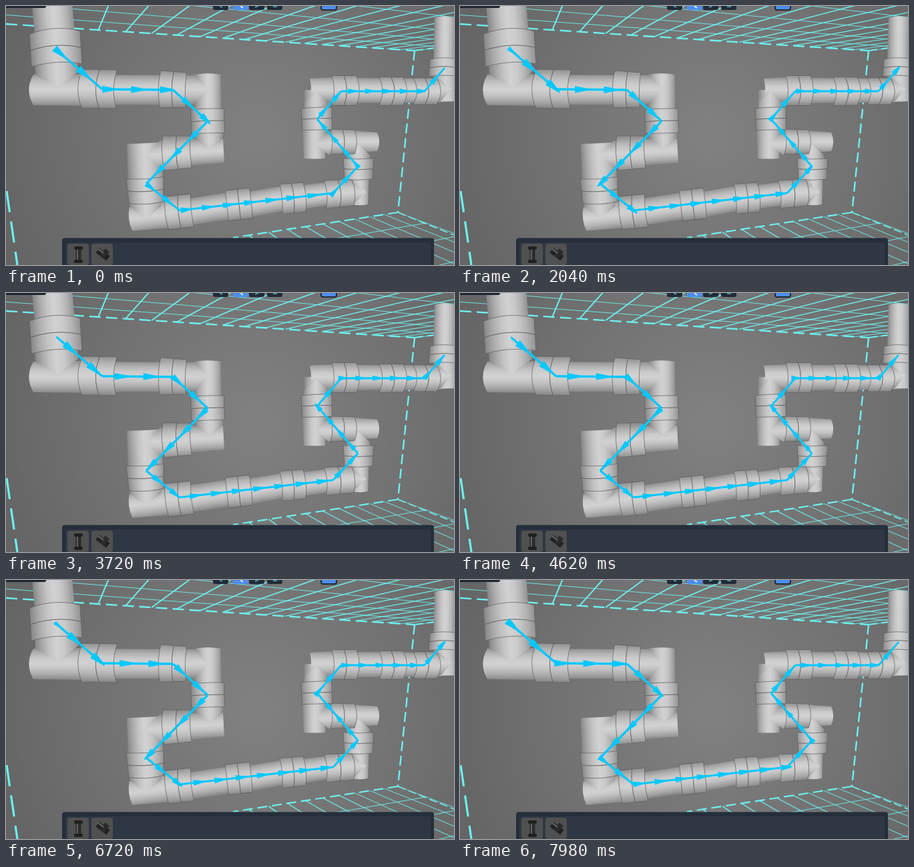
Write an HTML page with a canvas that moves like this. It is 671x389 px and loops after 8040 ms.

```html
<!DOCTYPE html>
<html lang="en">
<head>
<meta charset="utf-8">
<title>Pipe flow</title>
<style>
  html, body { margin: 0; width: 100%; height: 100%; overflow: hidden; background: #6b6b6b; }
  canvas { display: block; }
</style>
</head>
<body>
<canvas id="stage" width="671" height="389"></canvas>
<script>
const W = 671, H = 389;
const CYAN = '#6cf0ee', FLOW = '#06c8ff';
const stage = document.getElementById('stage').getContext('2d');
const scene = document.createElement('canvas');
scene.width = W;
scene.height = H;
const g = scene.getContext('2d');

function line(x1, y1, x2, y2, width, dash = [], color = CYAN) {
  g.strokeStyle = color;
  g.lineWidth = width;
  g.setLineDash(dash);
  g.beginPath();
  g.moveTo(x1, y1);
  g.lineTo(x2, y2);
  g.stroke();
  g.setLineDash([]);
}

function box(x, y, w, h, r, color) {
  g.fillStyle = color;
  g.beginPath();
  g.roundRect(x, y, w, h, r);
  g.fill();
}

// ---- Room ----
const DEPTH_VP = [100, 128], SIDE_VP = [1707, 139];

// Perspective grid starting at the far right corner (cx, cy) of a floor or ceiling
function grid(cx, cy, slope, count) {
  let x = cx, step = 20.5;
  for (let k = 0; k <= count; k++) {
    const y = cy + slope * (x - cx);
    line(x, y, x + (x - DEPTH_VP[0]) * 3, y + (y - DEPTH_VP[1]) * 3, 0.8 + k * 0.075);
    x -= step;
    step /= 0.955;
  }
  for (let k = 1; k <= 8; k++) {
    const m = k * 0.08 / (1 - k * 0.08);
    const qx = cx + (cx - DEPTH_VP[0]) * m, qy = cy + (cy - DEPTH_VP[1]) * m;
    line(qx, qy, qx * 2 - SIDE_VP[0], qy * 2 - SIDE_VP[1], 0.9);
  }
}

function drawRoom() {
  const light = g.createRadialGradient(375, 195, 20, 375, 195, 400);
  light.addColorStop(0, '#808080');
  light.addColorStop(0.55, '#727272');
  light.addColorStop(1, '#656565');
  g.fillStyle = light;
  g.fillRect(0, 0, W, H);

  grid(612, 67, 0.0654, 16);
  grid(587, 310, -0.153, 9);
  line(0, 27, 612, 67, 2.4, [17, 8]);
  line(612, 67, 671, 59, 2, [13, 6]);
  line(612, 67, 587, 310, 2.4, [15, 7]);
  line(587, 310, 340, 348, 2.2, [15, 7]);
  line(587, 310, 671, 344, 1.6, [12, 5]);
  line(1, 278, 17, 389, 3.2, [32, 14]);
}

// ---- Pipes ----
const bulgeAt = (x, y, r, a) =>
  2 * r * ((x - 330) * Math.cos(a) + (y - 190) * Math.sin(a)) / 1000;

// Shaded cylinder; a nonzero tip turns its far end into a mitre point
function tube(x1, y1, r1, x2, y2, r2, tip = 0, rim = false) {
  const a = Math.atan2(y2 - y1, x2 - x1), len = Math.hypot(x2 - x1, y2 - y1);
  const r = Math.max(r1, r2);
  const shade = g.createLinearGradient(0, -r, 0, r);
  ['#929292', '#b3b3b3', '#cacaca', '#d2d2d2', '#c3c3c3', '#a9a9a9', '#868686']
    .forEach((c, i) => shade.addColorStop(i / 6, c));
  g.save();
  g.translate(x1, y1);
  g.rotate(a);
  g.beginPath();
  g.moveTo(0, -r1);
  g.lineTo(len, -r2);
  if (tip) {
    g.lineTo(len + tip, 0);
    g.lineTo(len, r2);
  } else {
    g.quadraticCurveTo(len + bulgeAt(x2, y2, r2, a), 0, len, r2);
  }
  g.lineTo(0, r1);
  g.quadraticCurveTo(bulgeAt(x1, y1, r1, a), 0, 0, -r1);
  g.fillStyle = shade;
  g.fill();
  if (rim) {
    g.strokeStyle = 'rgba(95,95,95,.7)';
    g.lineWidth = 1;
    g.stroke();
  }
  g.restore();
}

// Two-ring coupling
function collar(x1, y1, r1, x2, y2, r2) {
  const mx = (x1 + x2) / 2, my = (y1 + y2) / 2, mr = (r1 + r2) / 2;
  tube(x1, y1, r1, mx, my, mr, 0, true);
  tube(mx, my, mr, x2, y2, r2, 0, true);
}

function drawPipes() {
  // inlet
  tube(69, -4, 30, 73, 45, 30);
  tube(41, 126, 23, 125, 126, 24);
  tube(75, 85, 32, 76, 101, 32, 21);
  collar(73, 40, 38, 76, 89, 38);
  // upper left run
  tube(160, 126, 22.5, 240, 126, 22);
  tube(302, 103, 19.5, 302, 160, 20);
  tube(266, 126, 22, 282, 126, 22, 19);
  collar(114, 124, 29, 166, 125, 29);
  collar(231, 125, 28, 270, 126, 26);
  // first step down
  tube(268, 220, 20, 326, 217, 18);
  tube(303, 185, 20.5, 304, 198, 20.5, 14);
  collar(301.5, 155, 25, 302.5, 191, 25);
  tube(206, 206, 25, 209, 262, 26);
  tube(243, 222, 22, 231, 222.5, 20, 22);
  collar(277, 219, 24, 236, 221, 26);
  // second step down
  tube(187, 320, 18, 248, 312, 21);
  tube(209, 288, 25, 209, 301, 23, 19);
  collar(208, 258, 28, 210, 295, 26);
  // long bottom run
  tube(276, 309, 20, 336, 300, 20);
  tube(364, 298, 19, 416, 289, 18.5);
  tube(444, 287, 18, 482, 282, 17.5);
  tube(529, 256, 14.5, 530, 298, 12);
  tube(510, 281, 18, 519, 280.5, 17, 21);
  collar(241, 311, 25, 279, 307, 25);
  collar(331, 300, 23, 367, 296, 23);
  collar(412, 290, 22.5, 447, 287, 22);
  collar(478, 283, 21, 519, 280, 20);
  // steps up on the right
  tube(515, 204, 17, 556, 204, 14);
  tube(528, 235, 18, 528, 224, 17, 16);
  collar(528, 260, 21, 528, 229, 23);
  tube(462, 178, 18, 462, 229, 16);
  tube(500, 205, 18, 482, 206, 17, 18);
  collar(486, 204, 19, 522, 204, 18);
  tube(466, 127, 19, 465, 160, 18);
  tube(455, 126, 17, 492, 126, 19);
  tube(465, 158, 18, 465, 146, 18, 17);
  collar(465, 153, 23, 466, 186, 22.5);
  // upper right run and outlet
  tube(520, 127, 19, 565, 127, 18.5);
  tube(592, 127, 18.5, 618, 127, 18);
  collar(488, 127, 22.5, 525, 127, 22.5);
  collar(559, 128, 21.5, 595, 128, 21);
  tube(657, 18, 15, 656, 84, 16);
  tube(657, 100, 18, 659, 144, 16);
  tube(640, 127, 18, 649, 126, 17, 19);
  collar(610, 128, 20, 645, 128, 20);
  collar(656, 80, 21, 656, 106, 23);
}

// ---- Interface ----
function drawInterface() {
  box(-5, -6, 65, 9, 3, '#1f2630');
  for (const x of [310, 364, 391]) box(x, -16, 23, 22, 3, '#222b37');
  box(340, -16, 23, 22, 3, '#4c8df0');
  box(471, -16, 25, 23, 4, '#222b37');
  box(473, -16, 21, 21, 2, '#4c8df0');
  line(320, 0, 324, 2, 1.5, [], '#43b7c4');
  line(351, 0, 355, 3, 2, [], '#e6efff');
  line(373, 2, 378, 0, 1.5, [], '#43b7c4');
  line(400, 1, 406, 1, 1.5, [], '#43b7c4');

  box(84, 348.5, 557, 50, 4, '#252e3b');
  box(89, 355, 547, 45, 3, '#2e3744');
  box(92, 357, 32, 32, 4, '#505050');
  box(128, 357, 32, 32, 4, '#505050');
  // straight pipe icon
  box(104.5, 362, 8, 22, 1, '#2b2b2b');
  box(102, 361, 13, 5, 2, '#202020');
  box(102, 381, 13, 5, 2, '#202020');
  line(107, 366, 107, 381, 1.5, [], '#747474');
  // branch icon
  line(137, 367, 153, 379, 9, [], '#222');
  line(143, 377, 152, 367, 8, [], '#2b2b2b');
  line(138, 365, 146, 371, 2, [], '#6c6c6c');
}

drawRoom();
drawPipes();
drawInterface();

// ---- Flow: x, y and distance along the route in arrow spacings ----
const route = [
  [78, 68, -0.1], [144, 125, 1.75], [250, 126, 4.2], [302, 173, 6.1],
  [210, 267, 9.75], [260, 307, 11.7], [490, 281, 18.95], [527, 241, 20.85],
  [466, 170, 24.5], [502, 128, 26.35], [627, 128, 31.2], [657, 93, 32.8]
];
const LOOP = 8040, TICK = 60, HOLD = 480, PERIOD = 945;

function arrow(u) {
  const start = route[0][2];
  const size = Math.min(1, 1 + (u - start) * 1.5);
  if (size <= 0) return;
  const d = Math.max(u, start);
  const i = route.findIndex((p, k) => k && d <= p[2]);
  if (i < 0) return;
  const [x1, y1, u1] = route[i - 1], [x2, y2, u2] = route[i];
  const f = (d - u1) / (u2 - u1);
  const length = Math.hypot(x2 - x1, y2 - y1) / (u2 - u1) * 0.5;
  const half = (2 + length * 0.15) * size, reach = length * size / 2;
  stage.save();
  stage.translate(x1 + (x2 - x1) * f, y1 + (y2 - y1) * f);
  stage.rotate(Math.atan2(y2 - y1, x2 - x1));
  stage.beginPath();
  stage.moveTo(-reach, -half);
  stage.lineTo(reach, -1);
  stage.lineTo(reach, 1);
  stage.lineTo(-reach, half);
  stage.fill();
  stage.restore();
}

function frame() {
  const t = Math.floor(performance.now() % LOOP / TICK) * TICK;
  const phase = Math.max(0, t - HOLD) / PERIOD % 1;
  stage.drawImage(scene, 0, 0);
  stage.strokeStyle = stage.fillStyle = FLOW;
  stage.lineJoin = 'round';
  for (let i = 1; i < route.length; i++) {
    stage.lineWidth = 3.6 - i * 0.08;
    stage.beginPath();
    stage.moveTo(route[i - 1][0], route[i - 1][1]);
    stage.lineTo(route[i][0], route[i][1]);
    stage.stroke();
  }
  for (let k = -1; k < 33; k++) arrow(k + phase);
  requestAnimationFrame(frame);
}
frame();
</script>
</body>
</html>
```
